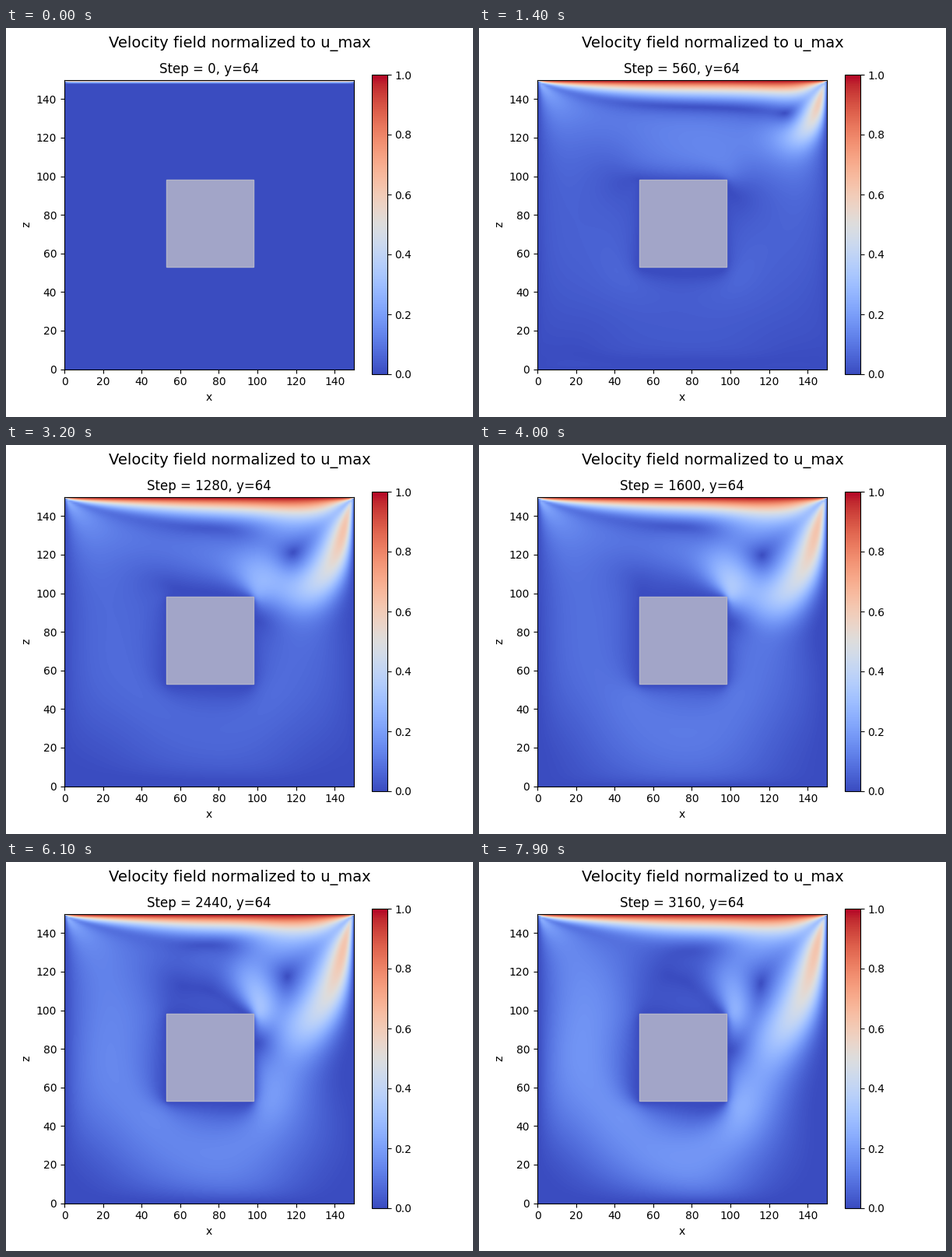
A matplotlib script that plays this animation: 600 by 500 pixels, repeating every 8 s.

```python
import numpy as np
import matplotlib.pyplot as plt
from matplotlib.animation import FuncAnimation
from matplotlib.patches import Rectangle

N = 151                  # lattice nodes per side
LID, NU = 0.28, 0.08     # lid speed and viscosity in lattice units
FRAMES, STRIDE = 80, 40
LO, SIZE = 53, 45        # square obstacle

# D2Q9 lattice; opposite of direction i is 8 - i
C = np.array([(cx, cz) for cx in (-1, 0, 1) for cz in (-1, 0, 1)])
CX, CZ = C.T
W = np.where(CX == 0, 2 / 3, 1 / 6) * np.where(CZ == 0, 2 / 3, 1 / 6)
OMEGA = 1 / (3 * NU + 0.5)

# Moments from populations, and relaxed equilibrium from moments
MOM = np.array([np.ones(9), CX, CZ], dtype=np.float32)
EQ = (OMEGA * W * np.array([
    np.ones(9), 3 * CX, 3 * CZ,
    4.5 * CX**2 - 1.5, 4.5 * CZ**2 - 1.5, 9 * CX * CZ,
])).T.astype(np.float32)


def stream_index():
    """Flat gather index for streaming with half-way bounce-back."""
    node = np.arange(N * N).reshape(N, N)
    solid = np.ones((N, N), bool)
    solid[1:-1, 1:-1] = False
    solid[LO:LO + SIZE, LO:LO + SIZE] = True
    src = np.empty((9, N, N), np.intp)
    for i, (cx, cz) in enumerate(C):
        shift = dict(shift=(cz, cx), axis=(0, 1))
        blocked = solid | np.roll(solid, **shift)
        src[i] = np.where(blocked, (8 - i) * N * N + node,
                          i * N * N + np.roll(node, **shift))
    return src.reshape(9, -1)


def speed(f):
    rho, jx, jz = MOM @ f
    v = (np.hypot(jx, jz) / rho / LID).reshape(N, N)
    v[-1] = 1
    return v


def simulate():
    src = stream_index()
    f = np.repeat(W[:, None], N * N, axis=1).astype(np.float32)
    q = np.empty((6, N * N), np.float32)
    post = np.empty_like(f)
    x = np.arange(1, N - 1)
    push = (LID / 6 * (1 - np.exp(-x)) * (1 - np.exp(x - N + 1.0)))
    push = push.astype(np.float32)
    lid = slice((N - 2) * N + 1, (N - 1) * N - 1)
    fields = []
    for step in range((FRAMES - 1) * STRIDE + 1):
        np.matmul(MOM, f, out=q[:3])
        rho, jx, jz = q[:3]
        q[3] = jx * jx / rho
        q[4] = jz * jz / rho
        q[5] = jx * jz / rho
        np.matmul(EQ, q, out=post)
        f *= np.float32(1 - OMEGA)
        post += f
        np.take(post, src, out=f, mode="clip")
        kick = push * rho[lid]
        f[6, lid] += kick
        f[0, lid] -= kick
        if step % STRIDE == 0:
            fields.append(speed(f))
    return fields


fields = simulate()

fig, ax = plt.subplots(figsize=(6, 5), dpi=100)
fig.suptitle("Velocity field normalized to u_max", fontsize=14)
image = ax.imshow(fields[0], origin="lower", cmap="coolwarm", vmin=0, vmax=1,
                  extent=(-0.5, N - 0.5, -0.5, N - 0.5),
                  interpolation="bilinear")
ax.set(xlim=(0, N - 1), ylim=(0, N - 1), xlabel="x", ylabel="z")
ax.add_patch(Rectangle((LO, LO), SIZE, SIZE, facecolor="#a2a5c8",
                       edgecolor="#b1b3c9", linewidth=1))
fig.colorbar(image, ax=ax)
title = ax.set_title("")


def update(k):
    image.set_data(fields[k])
    title.set_text(f"Step = {k * STRIDE}, y=64")
    return image, title


anim = FuncAnimation(fig, update, frames=FRAMES, interval=100,
                     repeat=True, repeat_delay=0, blit=False)
plt.show()
```
